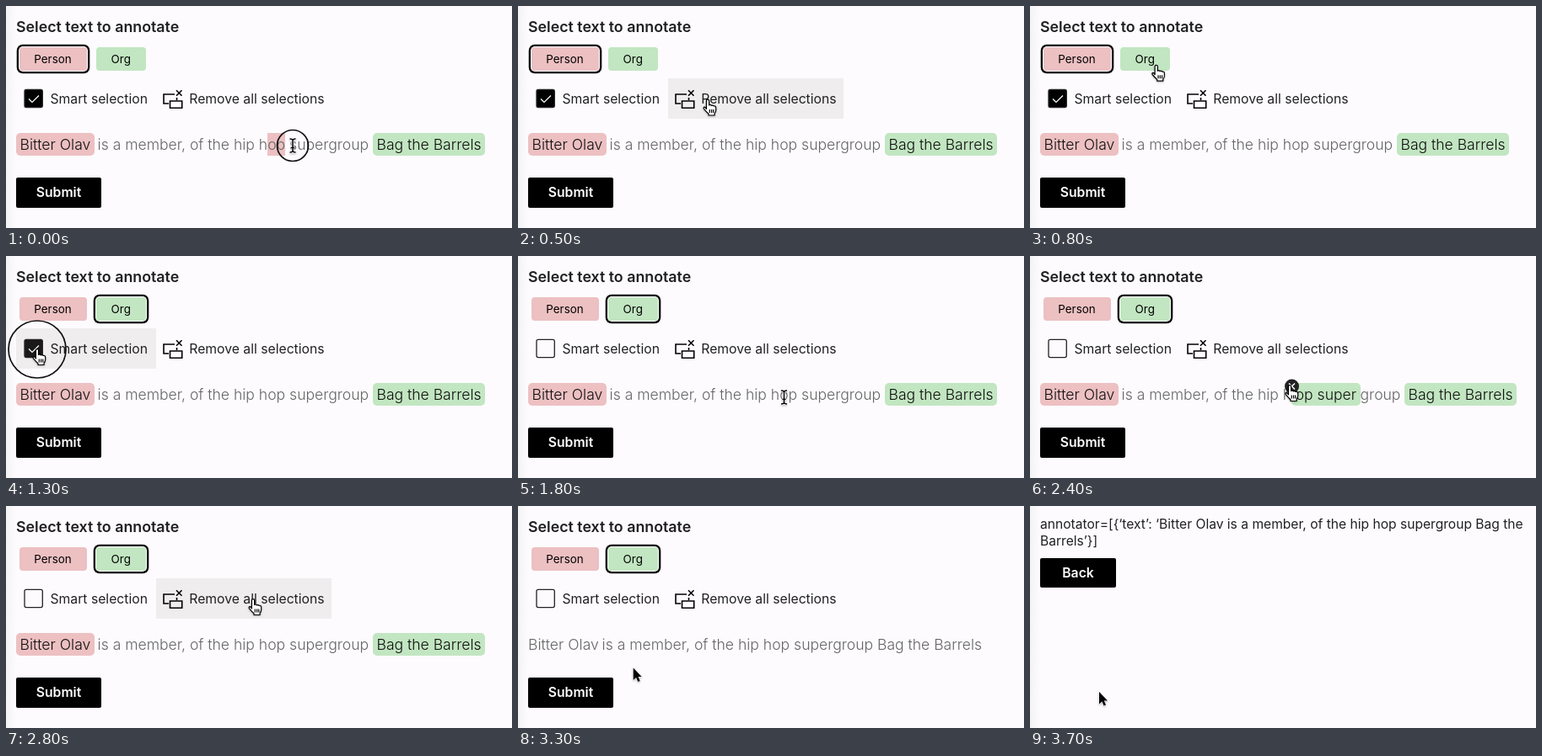
An HTML page for the animation above (4.3 s loop, 600x264 px).

```html
<!DOCTYPE html>
<html lang="en">
<head>
<meta charset="utf-8">
<title>Text annotator</title>
<style>
html, body { margin: 0; width: 100%; height: 100%; overflow: hidden; }
body {
  position: relative;
  background: linear-gradient(to right, #f3f2f4, #fdfbfe 12px);
  font: 15.72px Inter, sans-serif;
  color: #202022;
}
main, section { position: absolute; inset: 0; }
main > *, section > *, svg { position: absolute; white-space: pre; margin: 0; }
svg { left: 0; top: 0; }
h1 { left: 12px; top: 12px; font-size: 17.8px; line-height: 25px; font-weight: 600; }
.label { top: 49px; height: 28px; line-height: 28px; border-radius: 4px; font-size: 13.4px; text-align: center; color: #000; }
.on { box-shadow: 0 0 0 1px #fdfbfe, 0 0 0 3.3px #000; }
.pink { background: #edc0c2; }
.green { background: #c2e6c1; }
.tool { top: 85.5px; height: 48.5px; line-height: 49px; box-sizing: border-box; }
.hover { background: #efeded; }
.button { left: 12px; height: 35.5px; line-height: 35.5px; border-radius: 2px; background: #000; color: #fff; font-weight: 600; text-align: center; }
.line { top: 151px; height: 27px; line-height: 27px; font-size: 17.56px; font-weight: 300; color: #666; }
.line span { display: inline-block; height: 27px; vertical-align: top; }
.tag { position: relative; padding: 0 4.5px; border-radius: 5px; color: #111; }
.tag svg { left: -9.5px; top: -5.5px; }
section p { left: 12px; top: 12px; font-size: 15.6px; line-height: 19.5px; }
#hand, #beam, #arrow { filter: drop-shadow(0 1px 1px #0004); }
</style>
</head>
<body>
<main id="form">
  <h1>Select text to annotate</h1>
  <div class="label pink" id="person" style="left:15.5px;width:80px">Person</div>
  <div class="label green" id="org" style="left:107px;width:58.5px">Org</div>
  <div class="tool" id="smart" style="left:12px;width:165.5px;padding-left:40.5px">Smart selection</div>
  <div class="tool" id="remove" style="left:177.5px;width:208.5px;padding-left:39.8px">Remove all selections</div>
  <svg width="600" height="140" fill="none" stroke="#000" stroke-width="1.6">
    <rect id="box" x="22" y="99.3" width="21.3" height="21.3" rx="2" stroke="#222" stroke-width="1.3"/>
    <path id="tick" d="M27 110.5l4 4 8-8" stroke="#fff" stroke-width="1.2"/>
    <path d="M200 105H187V116H193M202.5 109V112M194.5 113H208.7V121.3H194.5ZM202 100.3l6.5 6.5M208.5 100.3l-6.5 6.5"/>
  </svg>
  <div class="line" id="first"></div>
  <div class="line" id="middle"></div>
  <div class="line" id="last"></div>
  <div class="button" style="top:204px;width:101px">Submit</div>
</main>
<section id="result">
  <p>annotator=[{‘text’: ‘Bitter Olav is a member, of the hip hop supergroup Bag the<br>Barrels’}]</p>
  <div class="button" style="top:61.5px;width:90px">Back</div>
</section>
<svg width="600" height="264">
  <defs>
    <path id="bar" d="M-3.5-8Q0-8 0-6V6Q0 8-3.5 8M3.5-8Q0-8 0-6M0 6Q0 8 3.5 8M-2 2.5H2"/>
  </defs>
  <g id="pointer">
    <circle id="press" fill="none" stroke="#111" stroke-width="1.7"/>
    <g id="hand" fill="#fff" stroke="#000" stroke-width="1.2" stroke-linejoin="round">
      <path d="M-1.6 11V1.3a1.6 1.6 0 0 1 3.2 0V6.5q1.4-1.2 2.8.4 1.6-1 2.7.6 2.4-.6 2.6 1.8V12q0 2.5-1.6 4.2V18.5H1V16.8Q-1.5 14.5-4.6 10.8q-.9-2 .9-2.2Q-2.6 8.9-1.6 11Z"/>
      <path d="M2.3 11.5v4M4.6 11.5v4M6.8 11.5v4"/>
    </g>
    <g id="beam" fill="none">
      <use href="#bar" stroke="#fff" stroke-width="3"/>
      <use href="#bar" stroke="#000" stroke-width="1.5"/>
    </g>
    <path id="arrow" d="M0 0V14.6L3.4 11.5 5.6 16.6 8 15.5 5.8 10.6H10Z" stroke="#fff" paint-order="stroke"/>
  </g>
</svg>
<script>
const $ = id => document.getElementById(id);
const LOOP = 4300, STEP = 100;
const body = 'is a member, of the hip hop supergroup';
const badge = '<svg width="19" height="19" stroke="#fff" stroke-width="1.5">' +
  '<circle cx="9.5" cy="9" r="8.5" fill="#222" stroke="none"/><path d="M6 5.5l7 7M13 5.5l-7 7"/></svg>';

// time, x, y of the pointer
const path = [
  [0, 340, 166], [100, 343, 166], [300, 301, 154], [400, 301, 154], [600, 149, 69],
  [800, 149.7, 70.7], [1000, 150, 71], [1200, 37, 111], [1400, 37, 111], [1800, 315.5, 168],
  [1900, 314, 168], [2100, 384, 168], [2400, 308, 154], [2500, 308, 154],
  [2800, 293, 111], [3100, 293, 111], [3400, 82, 221], [LOOP, 82, 221]
];
// radius of the click ring by time
const rings = {
  0: 18.5, 300: 18.5, 400: 34, 900: 18.5, 1000: 34, 1200: 18.5, 1300: 34,
  1900: 18.5, 2000: 18.5, 2100: 18.5, 2500: 34, 3100: 24, 3500: 18.5, 3600: 34
};
// start time, end time, first and last character, look
const marks = [
  [0, 100, 25, 27, 'pink'], [100, 500, 24, 27, 'pink tag'],
  [1900, 2000, 25, 26, 'green'], [2000, 2100, 25, 29, 'green'],
  [2100, 2200, 25, 33, 'green'], [2200, 2600, 25, 33, 'green tag']
];

// the picture advances in steps, with three longer rests
function hold(t) {
  if (t >= 3700) return 3700;
  if (t >= 3100 && t < 3300) return 3100;
  if (t >= 2800 && t < 3100) return 2800;
  return Math.floor(t / STEP) * STEP;
}

function pointerAt(t) {
  const i = path.findIndex(k => k[0] > t);
  const [t0, x0, y0] = path[i - 1], [t1, x1, y1] = path[i];
  const u = (t - t0) / (t1 - t0), e = u * u * (3 - 2 * u);
  return [x0 + (x1 - x0) * e, y0 + (y1 - y0) * e];
}

const show = (id, on) => $(id).style.display = on ? '' : 'none';
const span = (text, look, extra = '') => `<span class="${look}">${text}${extra}</span>`;

function place(id, x, html) {
  $(id).style.left = x + 'px';
  $(id).innerHTML = html;
}

function draw(t) {
  const [x, y] = pointerAt(t);
  const inside = (l, top, r, b) => x >= l && x <= r && y >= top && y <= b;
  const mark = marks.find(m => t >= m[0] && t < m[1]);
  const tagged = !!mark && mark[4].includes('tag');
  const cleared = t >= 3100, checked = t < 1400, done = t >= 3700;

  show('form', !done);
  show('result', done);
  $('person').classList.toggle('on', t < 1100);
  $('org').classList.toggle('on', t >= 1100);

  const onSmart = inside(12, 85.5, 177.5, 134), onRemove = inside(177.5, 85.5, 386, 134);
  $('smart').classList.toggle('hover', onSmart);
  $('remove').classList.toggle('hover', onRemove);
  $('box').setAttribute('fill', checked ? (onSmart ? '#1a1a1a' : '#000') : '#fdfbfe');
  show('tick', checked);

  let text = body;
  if (mark) {
    const [, , a, b, look] = mark;
    text = body.slice(0, a) + span(body.slice(a, b), look, tagged ? badge : '') + body.slice(b);
  }
  place('first', 12, span('Bitter Olav', cleared ? '' : 'pink tag'));
  place('middle', cleared ? 99.6 : 108.6, text);
  place('last', cleared ? 426 : tagged ? 444 : 435, span('Bag the Barrels', cleared ? '' : 'green tag'));

  const hand = !done && (onSmart || onRemove || inside(15, 49, 96, 77) || inside(107, 49, 166, 77) ||
    inside(12, 204, 113, 240) || (tagged && y < 156));
  const beam = !hand && !done && inside(12, 150, 580, 180);
  show('hand', hand);
  show('beam', beam);
  show('arrow', !hand && !beam);
  show('press', rings[t]);
  $('press').setAttribute('r', rings[t] || 0);
  $('pointer').setAttribute('transform', `translate(${x} ${y})`);
}

let last = -1;
function tick() {
  const t = hold(performance.now() % LOOP);
  if (t !== last) draw(last = t);
  requestAnimationFrame(tick);
}
tick();
</script>
</body>
</html>
```
